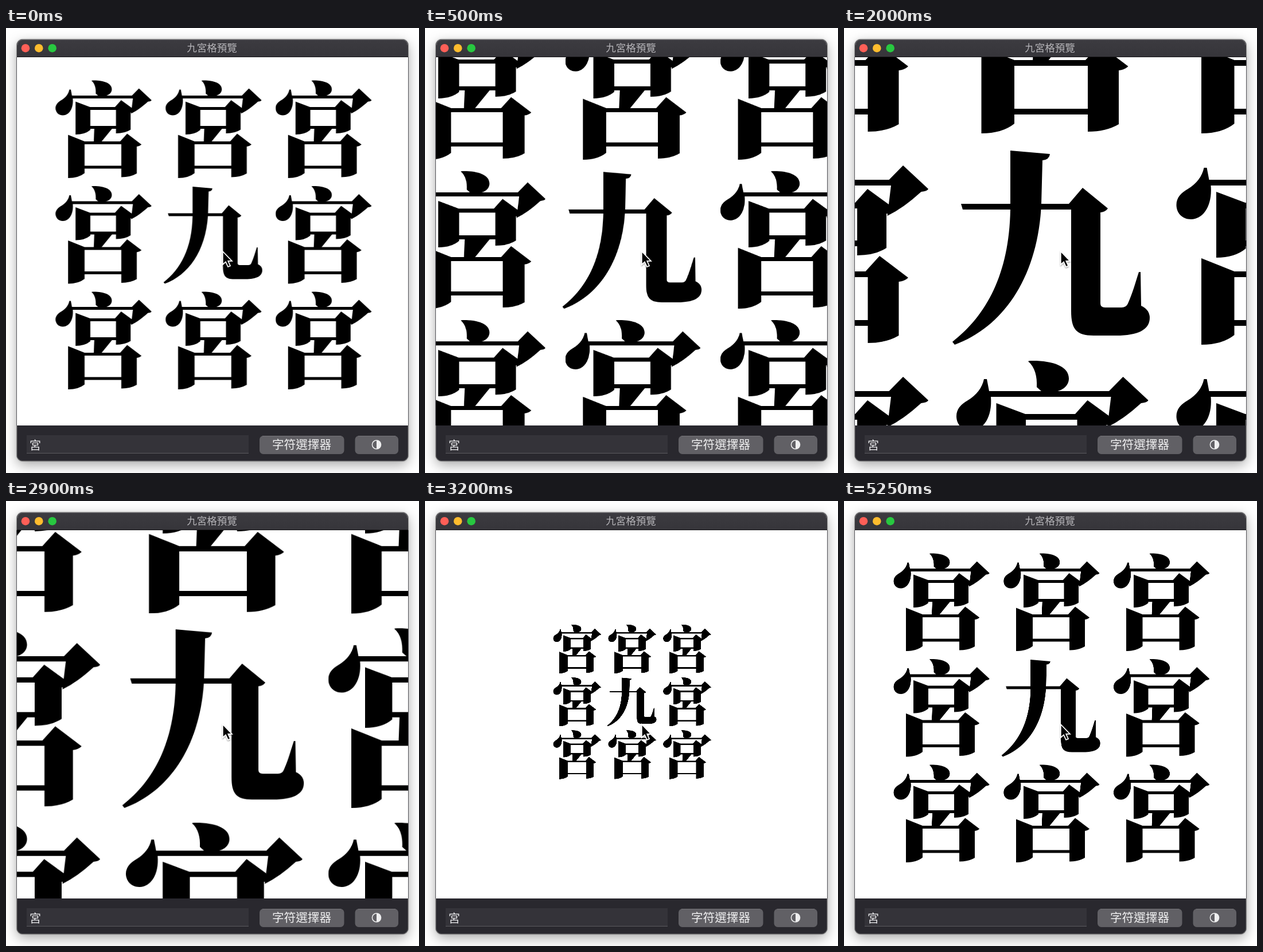
An HTML page that plays this animation: 720 by 777 pixels, repeating every 5.41 s.

```html
<!DOCTYPE html>
<html lang="zh-Hant">
<head>
<meta charset="utf-8">
<title>九宮格預覽</title>
<style>
  html, body { margin: 0; width: 100%; height: 100%; overflow: hidden; background: #fff; }
  svg { position: absolute; left: 0; top: 0; display: block; }
  .window {
    position: absolute; left: 19px; top: 20px; width: 682px; height: 736px; border-radius: 10px;
    background: #29282e;
    box-shadow: 0 0 0 1px rgba(0,0,0,.3), 0 7px 22px rgba(0,0,0,.34), 0 0 5px rgba(0,0,0,.12);
  }
  text { font-family: "Noto Sans CJK TC", "Noto Sans CJK HK", "Noto Sans CJK JP", "Noto Sans CJK", sans-serif; }
  #grid { transform-origin: 360.5px 340px; }
</style>
</head>
<body>
<div class="window"></div>
<svg width="720" height="777" viewBox="0 0 720 777">
  <defs>
    <linearGradient id="bar" x2="0" y2="1">
      <stop stop-color="#3c3b40"/><stop offset="1" stop-color="#36353a"/>
    </linearGradient>
    <clipPath id="page"><rect x="19" y="51" width="682" height="643"/></clipPath>
    <filter id="soft" x="-50%" y="-50%" width="200%" height="200%">
      <feDropShadow dx="0" dy="1.5" stdDeviation="1.3" flood-opacity=".4"/>
    </filter>
    <!-- Both glyphs are drawn in the centre cell at double size. -->
    <g id="gong">
      <path d="M321 213 Q322 211.500 329 212 C365 212 392 222 392 243 C392 257 379 266 361 267 Q350 268 345 266 L336 258 C337 240 333 223 321 213Z"/>
      <path d="M253 265 H462 L486.500 240 L530.500 281 Q529 285 518 286 C497 305 479 318 459 328 L465.500 275 H256 C259 310 243 334 221.500 334 C206 334 196 323 196 309 C196 296 204 288 216 281 C231 272 241 259 244 244 H249Z"/>
      <path d="M265.500 286 L316 305 H403 L424.500 281 L461.500 308 L464 325 L457.500 324 V384 Q438 397 406.500 397 V381 H317 V385 Q298 401 265.500 401Z M317 315 V371 H406.500 V315Z" fill-rule="evenodd"/>
      <path d="M331 378 L329 427 H355 L395 378Z"/>
      <path d="M239.500 402 L297 425 H421 L445.500 398 L495.500 436 Q489 442 479 443 V537 Q457 550 425 550 V520 H297 V536 Q276 553 239.500 553Z M297 435 V510 H425 V435Z" fill-rule="evenodd"/>
    </g>
    <g id="jiu">
      <path d="M290 214 L359 220 Q358 230 346 231 L344 307 H392 L416 279 L460 315 Q456 321 447 322 V481 Q447 488 455 488 H484 Q492 488 495 481 C503 463 508 445 514 426 H517 L518 485 Q533 492 533 506 C533 527 512 537 475 537 H435 C405 537 396 526 396 494 V317 H343.500 C335 440 275 523 193 553 L189 548 C248 502 288 430 290 317 H207 L204 307 H290Z"/>
    </g>
  </defs>

  <path d="M19 51 V30 A10 10 0 0 1 29 20 H691 A10 10 0 0 1 701 30 V51Z" fill="url(#bar)"/>
  <path d="M20 30 A9.500 9.500 0 0 1 29 20.500 H691 A9.500 9.500 0 0 1 700 30" fill="none" stroke="#67666a"/>
  <rect x="19" y="50" width="682" height="1" fill="#161518"/>
  <circle cx="34" cy="35.200" r="7.300" fill="#ff5f57"/>
  <circle cx="57.300" cy="35.200" r="7.300" fill="#febc2e"/>
  <circle cx="80.700" cy="35.200" r="7.300" fill="#28c840"/>
  <text x="359" y="41.200" font-size="17.500" text-anchor="middle" fill="#b5b4b8">九宮格預覽</text>

  <g clip-path="url(#page)">
    <rect x="19" y="51" width="682" height="643" fill="#fff"/>
    <g id="grid"></g>
  </g>
  <path d="M18.500 51 V694 M701.500 51 V694" stroke="#55545a"/>

  <path d="M19.500 694 V746 A9.500 9.500 0 0 0 29 755.500 H691 A9.500 9.500 0 0 0 700.500 746 V694" fill="none" stroke="#48474c"/>
  <rect x="36" y="711" width="387" height="32" fill="#343339"/>
  <path d="M36 742.500 H423" stroke="#5b5a5f"/>
  <text x="41" y="736" font-size="20" fill="#ececee">宮</text>
  <g fill="#616065">
    <rect x="442" y="712" width="147.500" height="32" rx="6.500"/>
    <rect x="608.500" y="712" width="75.500" height="32" rx="6.500"/>
  </g>
  <path d="M447 712.500 H584 M614 712.500 H679" stroke="#757479"/>
  <text x="515.500" y="735.200" font-size="20.600" text-anchor="middle" fill="#f0f0f1">字符選擇器</text>
  <circle cx="646" cy="727.500" r="7.600" fill="none" stroke="#eeeeef" stroke-width="1.500"/>
  <path d="M646 719.900 A7.600 7.600 0 0 1 646 735.100Z" fill="#eeeeef"/>

  <path d="M377.800 390 V413 L383 408.300 L387 417 L391 415.200 L387.200 406.800 H394Z"
        fill="#000" stroke="#fff" stroke-width="1.700" filter="url(#soft)"/>
</svg>
<script>
  const LOOP = 5410;
  const PITCH = { x: 383.5, y: 369 };
  // [time in ms, zoom]; each zoom holds until the next step
  const ZOOMS = [
    [0, 1], [300, 1.05], [400, 1.19], [500, 1.41], [600, 2],
    [2900, 1.84], [3000, 1.446], [3100, 0.86], [3200, 0.5],
    [4700, 1], [LOOP, 1]
  ];

  const grid = document.getElementById('grid');
  for (const row of [-1, 0, 1]) {
    for (const col of [-1, 0, 1]) {
      const cell = document.createElementNS('http://www.w3.org/2000/svg', 'use');
      cell.setAttribute('href', row || col ? '#gong' : '#jiu');
      cell.setAttribute('x', col * PITCH.x);
      cell.setAttribute('y', row * PITCH.y);
      grid.append(cell);
    }
  }

  grid.animate(
    ZOOMS.map(([time, zoom]) => ({
      offset: time / LOOP,
      transform: `scale(${zoom / 2})`,
      easing: 'step-end'
    })),
    { duration: LOOP, iterations: Infinity }
  );
</script>
</body>
</html>
```
